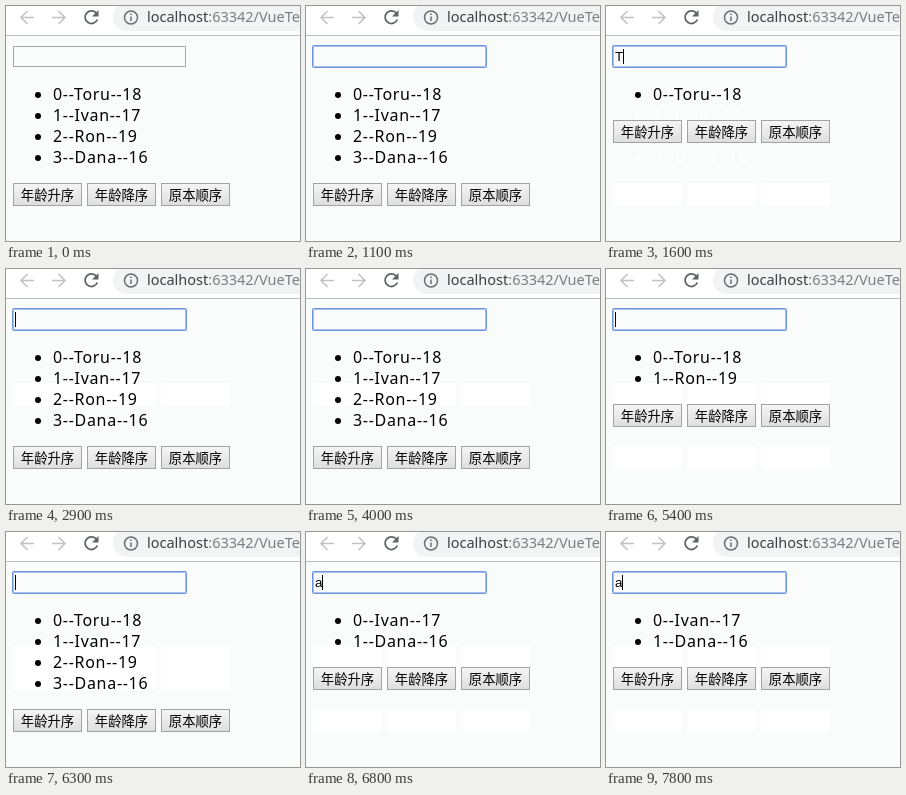
Recreate the animation shown at these times as an HTML page. Size 294 by 235 pixels, loop 8000 ms.

```html
<!DOCTYPE html>
<html lang="zh">
<head>
<meta charset="utf-8">
<title>List filter</title>
<style>
  html, body { margin: 0; width: 100%; height: 100%; overflow: hidden; background: #fafcfb; }
  svg { display: block; }
  text { white-space: pre; }
  .url { font: 14.5px "Noto Sans", sans-serif; fill: #3c3f43; }
  .row { font: 16px "Noto Sans", sans-serif; letter-spacing: .7px; }
  .label { font: 13.333px "Noto Sans CJK SC", "Noto Sans CJK", sans-serif; text-anchor: middle; }
  .typed { font: 13.333px "Liberation Sans", Arial, sans-serif; }
</style>
</head>
<body>
<svg width="294" height="235" viewBox="0 0 294 235">
  <defs>
    <linearGradient id="face" x2="0" y2="1">
      <stop stop-color="#f5f5f5"/><stop offset="1" stop-color="#dedede"/>
    </linearGradient>
  </defs>
  <rect width="294" height="235" fill="#fafcfb"/>

  <!-- browser toolbar -->
  <rect width="294" height="29" fill="#fff"/>
  <rect x="107" y="-3" width="220" height="28" rx="14" fill="#f1f3f4"/>
  <path d="M0 29.5H294" stroke="#bcbec0"/>
  <g fill="none" stroke-width="1.5">
    <path d="M28 11.5H15.5M21.5 5L15 11.5L21.5 18M46 11.5H58.5M52.5 5L59 11.5L52.5 18" stroke="#bfc1c3"/>
    <path d="M90.5 7.5A6.3 6.3 0 1 0 91.3 13.5" stroke="#5f6368" stroke-width="1.8"/>
    <circle cx="125" cy="11.5" r="6.5" stroke="#6b6f73"/>
    <path d="M125 10.5V15M125 7.5V9" stroke="#6b6f73"/>
  </g>
  <path d="M92.5 4V10.5H86Z" fill="#5f6368"/>
  <text class="url" x="141" y="16">localhost<tspan fill="#7b7f83">:63342/VueTe</tspan></text>

  <!-- page -->
  <g id="traces" fill="#fff"></g>
  <rect x="7.5" y="40.5" width="172" height="20" fill="none" stroke="#a6a8a8"/>
  <g id="focus" fill="none">
    <rect x="6.5" y="39.5" width="174" height="22" rx="1" stroke="#6d94dc"/>
    <rect x="7.5" y="40.5" width="172" height="20" stroke="#a9bfe8"/>
  </g>
  <text id="typed" class="typed" x="9" y="55"></text>
  <rect id="caret" y="43" width="1" height="15"/>
  <g id="list"></g>
  <g id="buttons"></g>
</svg>
<script>
const LOOP = 8000;
const people = [['Toru', 18], ['Ivan', 17], ['Ron', 19], ['Dana', 16]];
const buttonX = [7, 81, 155];
const labels = ['年龄升序', '年龄降序', '原本顺序'];

// Pale repaint traces: bands of [top, height], an erased letter, old rows.
const steps = [
  { at: 0, typed: '', query: '', bands: [] },
  { at: 1600, typed: 'T', query: 'T', bands: [[177, 23]], oldRows: true },
  { at: 2900, typed: '', query: '', bands: [[114, 23]], erased: 'T' },
  { at: 4400, typed: 'o', query: 'o', bands: [[114, 23], [177, 23]] },
  { at: 5400, typed: '', query: 'o', bands: [[114, 23], [177, 23]], erased: 'o' },
  { at: 5500, typed: '', query: '', bands: [[114, 44]], erased: 'o' },
  { at: 6800, typed: 'a', query: 'a', bands: [[114, 23], [177, 23]] },
];
const caretToggles = [600, 1100, 1600, 2100, 2600, 3100, 3600, 4000,
  4400, 4800, 5300, 5800, 6300, 7300, 7800];
const caretX = { '': 9, T: 17, o: 16, a: 16 };

const el = id => document.getElementById(id);
const show = (id, on) => el(id).setAttribute('visibility', on ? 'visible' : 'hidden');

const rows = group => group.map(([name, age], i) => `
  <circle cx="32" cy="${89 + 21 * i}" r="3"/>
  <text class="row" x="47" y="${94 + 21 * i}">${i}--${name}--${age}</text>`).join('');

const band = ([y, h], full) => buttonX.map((x, i) =>
  `<rect x="${x}" y="${y}" width="${full && i === 0 ? 74 : 69}" height="${h}"/>`).join('');

el('buttons').innerHTML = buttonX.map((x, i) => `
  <rect x="${x + .5}" y="177.5" width="68" height="22" fill="url(#face)" stroke="#a3a3a3"/>
  <text class="label" x="${x + 34.5}" y="193.5">${labels[i]}</text>`).join('');

let current;
function apply(step) {
  current = step;
  const matches = people.filter(([name]) => name.includes(step.query));
  const hidden = people.length - matches.length;
  el('typed').textContent = step.typed;
  el('caret').setAttribute('x', caretX[step.typed]);
  el('list').innerHTML = rows(matches);
  el('traces').innerHTML = (step.oldRows ? rows(people) : '') +
    step.bands.map(b => band(b, !hidden)).join('') +
    `<text class="typed" x="9" y="55">${step.erased || ''}</text>`;
  el('buttons').setAttribute('transform', `translate(0 ${-21 * hidden})`);
}

function draw(now) {
  const t = now % LOOP;
  const step = steps.filter(s => s.at <= t).pop();
  if (step !== current) apply(step);
  show('focus', t >= 600);
  show('caret', caretToggles.filter(at => at <= t).length % 2);
}

const start = performance.now();
function tick() {
  draw(performance.now() - start);
  requestAnimationFrame(tick);
}
tick();
</script>
</body>
</html>
```
